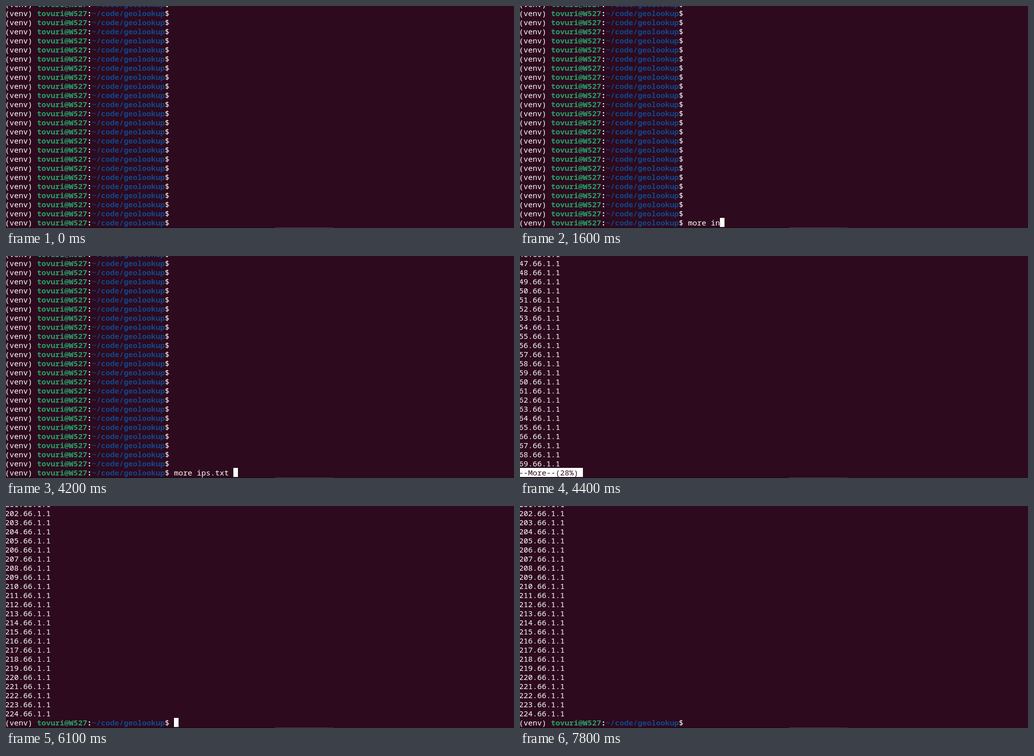
An HTML page that plays this animation: 1001 by 439 pixels, repeating every 8 s.

```html
<!DOCTYPE html>
<html lang="en">
<head>
<meta charset="utf-8">
<title>Terminal</title>
<style>
  html, body { margin: 0; width: 100%; height: 100%; overflow: hidden; background: #2d0a1e; }
  #stage { position: relative; width: 1001px; height: 439px; overflow: hidden; }
  #screen {
    position: absolute; left: -2px; top: -13px; margin: 0;
    font: 15px/18px "Noto Sans Mono", "DejaVu Sans Mono", monospace;
    font-variant-ligatures: none; color: #fff; white-space: pre;
  }
  #screen div { height: 18px; }
  b { font-weight: 700; }
  .user { color: #26a269; }
  .path { color: #12488b; }
  .more, .cursor { display: inline-block; height: 18px; vertical-align: top; background: #fff; color: #2d0a1e; }
  .cursor { width: 9px; }
  #edge {
    position: absolute; left: 0; bottom: 0; width: 100%; height: 1px;
    background: linear-gradient(90deg, #17070f 530px, #4a3541 530px 645px, #21101a 645px);
  }
</style>
</head>
<body>
<div id="stage">
  <div id="screen"></div>
  <div id="edge"></div>
</div>
<script>
const LOOP = 8000;
const ROWS = 24;
const screenEl = document.getElementById('screen');

const prompt = '(venv) <b class="user">tovuri@W527</b><b>:</b>' +
  '<b class="path">~/code/geolookup</b>$ ';

const row = html => `<div>${html}</div>`;
const fill = makeRow => Array.from({ length: ROWS }, (_, i) => row(makeRow(i))).join('');
const addresses = last => fill(i => `${last - ROWS + 1 + i}.66.1.1`);
const more = percent => `<span class="more">--More--(${percent}%)</span>`;

const shell = { body: fill(() => prompt), lead: prompt };
const page1 = { body: addresses(69), lead: more(28) };
const page2 = { body: addresses(138), lead: more(59) };
const page3 = { body: addresses(207), lead: more(92) };
const done = { body: addresses(224), lead: prompt };

// [start ms, view, typed text, cursor visible]
const steps = [
  [0, shell, '', false],
  [400, shell, '', true],
  [700, shell, 'm', true],
  [800, shell, 'mo', true],
  [900, shell, 'mor', true],
  [1000, shell, 'more', true],
  [1200, shell, 'more ', true],
  [1500, shell, 'more i', true],
  [1600, shell, 'more in', true],
  [2100, shell, 'more in', false],
  [2600, shell, 'more i', true],
  [3000, shell, 'more ip', true],
  [3100, shell, 'more ips.txt ', true],
  [3600, shell, 'more ips.txt ', false],
  [4200, shell, 'more ips.txt ', true],
  [4400, page1, '', true],
  [5000, page1, '', false],
  [5500, page2, '', true],
  [5800, page3, '', true],
  [6100, done, '', true],
  [6400, done, 'p', true],
  [6900, done, 'p', false],
  [7200, done, 'p', true],
  [7300, done, '', true],
  [7800, done, '', false]
];

let shown = null;

function draw() {
  const time = performance.now() % LOOP;
  const step = steps.findLast(([start]) => start <= time);
  if (step !== shown) {
    const [, view, typed, cursorOn] = step;
    const cursor = cursorOn ? '<span class="cursor"></span>' : '';
    screenEl.innerHTML = view.body + row(view.lead + typed + cursor);
    shown = step;
  }
  requestAnimationFrame(draw);
}
draw();
</script>
</body>
</html>
```
